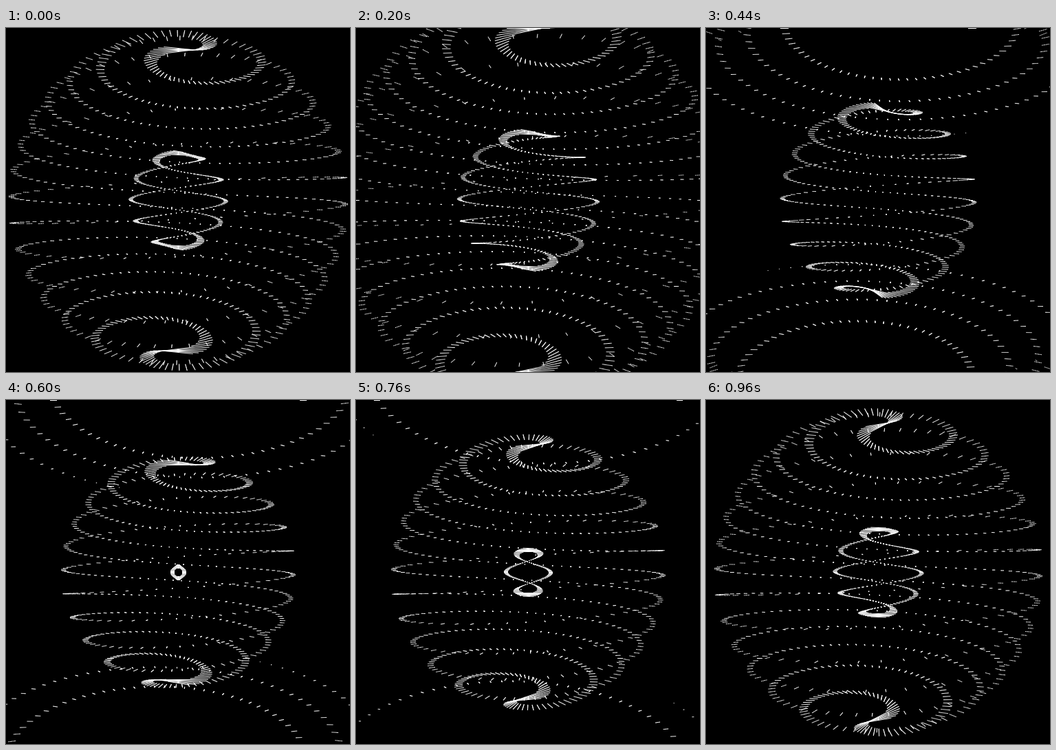
An HTML page with a canvas for the animation above (1 s loop, 500 px wide and 500 px high).

```html
<!DOCTYPE html>
<html lang="en">
<head>
<meta charset="utf-8">
<title>Twisted rods, spherical waves</title>
<style>
  html, body { margin: 0; width: 100%; height: 100%; overflow: hidden; background: #000; }
  canvas { display: block; width: 500px; height: 500px; }
</style>
</head>
<body>
<canvas id="stage" width="500" height="500"></canvas>
<script>
const ctx = document.getElementById('stage').getContext('2d');

const LOOP = 1000;    // ms
const STEP = 40;      // ms per picture
const SIZE = 500;
const HALF = SIZE / 2;
const TWIST = 8 * 2 * Math.PI / SIZE;   // eight turns over the whole stack
const CAMERA = 500;   // distance from eye to centre
const GAP = 150;      // distance between two waves
const START = -84;    // inner radius of the first wave at time 0
const BAND = 6;       // thickness of a wave

// One lit point at r along a rod, seen in perspective.
function plot(r, y, cos, sin) {
  const scale = CAMERA / (CAMERA - r * sin);
  ctx.fillRect(HALF + r * cos * scale, HALF + y * scale, 1, 1);
}

// Distance along a rod at height y where it leaves a sphere.
function reach(radius, y) {
  return Math.sqrt(Math.max(0, radius * radius - y * y));
}

function drawWave(inner) {
  const outer = inner + BAND;
  if (outer <= 0) return;
  for (let y = -HALF; y < HALF; y++) {
    if (Math.abs(y) >= outer) continue;
    const cos = Math.cos(y * TWIST);
    const sin = Math.sin(y * TWIST);
    const first = Math.ceil(reach(Math.max(0, inner), y));
    const end = Math.min(reach(outer, y), HALF + 1);
    for (let r = first; r < end; r++) {
      if (r < HALF) plot(r, y, cos, sin);
      if (r > 0) plot(-r, y, cos, sin);
    }
  }
}

function draw(time) {
  ctx.fillStyle = '#000';
  ctx.fillRect(0, 0, SIZE, SIZE);
  ctx.fillStyle = '#fff';
  for (let k = 0; k < 3; k++) {
    drawWave(START + GAP * (k + time / LOOP));
  }
}

let shown = -1;

function tick(now) {
  const time = Math.floor((now % LOOP) / STEP) * STEP;
  if (time !== shown) draw(time);
  shown = time;
  requestAnimationFrame(tick);
}

draw(0);
requestAnimationFrame(tick);
</script>
</body>
</html>
```
